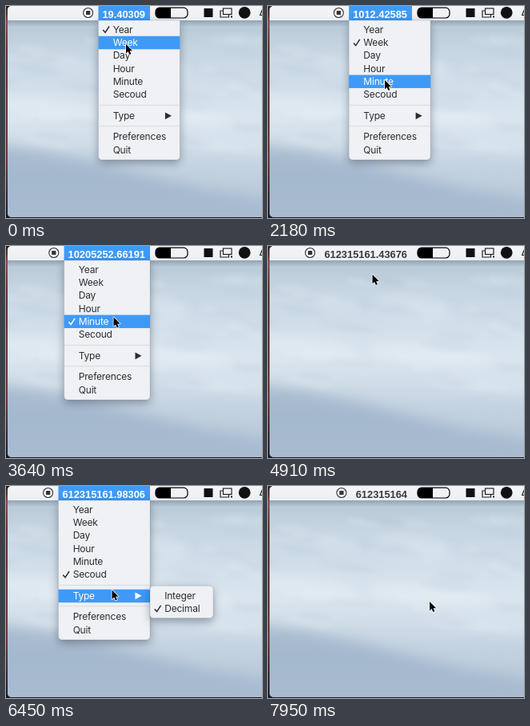
Animation of 320 by 266 pixels, one loop 8000 ms. Source, as an HTML page with a canvas:

```html
<!DOCTYPE html>
<html lang="en">
<head>
<meta charset="utf-8">
<title>Menu bar counter</title>
<style>
html, body { margin: 0; width: 100%; height: 100%; overflow: hidden; background: #3a2526; }
canvas { display: block; width: 320px; height: 266px; }
</style>
</head>
<body>
<canvas id="stage"></canvas>
<script>
const W = 320, H = 266, LOOP = 8000, STEP = 1000 / 22;
const BAR = 18, ROW = 16.4, BLUE = '#3f9af7', INK = '#2b2c2f';
const TITLE_FONT = 'bold 12.85px "Liberation Sans", Arial, sans-serif';
const MENU_FONT = '12px Inter, "Open Sans", sans-serif';

const canvas = document.getElementById('stage');
const dpr = window.devicePixelRatio || 1;
canvas.width = W * dpr;
canvas.height = H * dpr;
const ctx = canvas.getContext('2d');

// Row label and vertical centre
const ROWS = [
  ['Year', 29.5], ['Week', 45.8], ['Day', 62], ['Hour', 78.3], ['Minute', 94.6],
  ['Secoud', 111], ['Type', 137.8], ['Preferences', 164], ['Quit', 180.6]
];
const SUB_ROWS = [['Integer', 137.5], ['Decimal', 153.8]];
const UNIT = { Year: 31557600, Week: 604800, Minute: 60, Secoud: 1 };

// Each visit to the menu: opened, item clicked, unit shown meanwhile
const VISITS = [
  { open: -200, click: 350, unit: 'Year' },
  { open: 1480, click: 2400, unit: 'Week' },
  { open: 3187.2, click: 4150, unit: 'Minute' },
  { open: 5455.39, click: 7210, unit: 'Secoud', sub: 6100 }
];
const BLINK = 90, FADE = 180;

// Pointer stops: time, x, y
const PATH = [
  [0, 150, 48], [480, 150, 48], [1150, 149.5, 7], [1540, 149.5, 7],
  [2130, 146, 93], [2500, 146, 93], [3000, 138, 8], [3250, 138, 8],
  [3794, 133.6, 110], [4450, 133, 109], [5151, 129.6, 8], [5520, 129.6, 8],
  [6000, 132.5, 130.5], [6480, 132.5, 130.5], [6950, 202, 145], [8000, 202, 145]
];

function pointerAt(t) {
  const i = Math.max(1, PATH.findIndex(p => p[0] > t));
  const [t0, x0, y0] = PATH[i - 1], [t1, x1, y1] = PATH[i];
  const p = (t - t0) / (t1 - t0), s = p * p * (3 - 2 * p);
  return { x: x0 + (x1 - x0) * s, y: y0 + (y1 - y0) * s };
}

const secondsAt = t => 612315161.436765 + (t - 108 * STEP) / 1000;

function titleText(t, unit, whole) {
  const v = secondsAt(t) / UNIT[unit];
  return whole ? String(Math.floor(v)) : (Math.floor(v * 1e5) / 1e5).toFixed(5);
}

function titleLeft(text) {
  ctx.font = TITLE_FONT;
  ctx.letterSpacing = '0px';
  return 174 - ctx.measureText(text).width;
}

function fillBox(g, x, y, w, h, color, r = 0) {
  g.fillStyle = color;
  g.beginPath();
  g.roundRect(x, y, w, h, r);
  g.fill();
}

function polygon(g, pts) {
  g.beginPath();
  pts.forEach(([x, y]) => g.lineTo(x, y));
  g.closePath();
}

function gradient(g, y0, y1, stops) {
  const grad = g.createLinearGradient(0, y0, 0, y1);
  stops.forEach(([y, c]) => grad.addColorStop((y - y0) / (y1 - y0), c));
  return grad;
}

function random(seed) {
  return () => (seed = seed * 16807 % 2147483647) / 2147483647;
}

function paintSky() {
  const c = document.createElement('canvas');
  c.width = W * dpr;
  c.height = H * dpr;
  const g = c.getContext('2d');
  g.scale(dpr, dpr);
  fillBox(g, 0, 0, W, H, gradient(g, 0, H, [
    [0, '#2c2324'], [20, '#8a4a40'], [60, '#5c3433'], [190, '#6a3b38'], [266, '#1d1c20']
  ]));
  g.beginPath();
  g.roundRect(2, 0, W, 265, [5, 0, 0, 5]);
  g.clip();
  fillBox(g, 0, 0, W, H, gradient(g, 0, H, [
    [0, '#b4c5d3'], [22, '#b8c9d7'], [50, '#c4d4e0'], [80, '#cddbe7'], [112, '#d5e1eb'],
    [140, '#dae5ee'], [170, '#d1dde8'], [200, '#c5d3e1'], [266, '#b2c4d6']
  ]));

  const puff = (x, y, rx, ry, color) => {
    g.fillStyle = color;
    g.beginPath();
    g.ellipse(x, y, rx, ry, 0.12, 0, 7);
    g.fill();
  };
  g.filter = `blur(${7 * dpr}px)`;
  puff(75, 72, 40, 8, 'rgba(226,235,243,.4)');
  puff(180, 78, 50, 17, 'rgba(226,235,243,.4)');
  puff(50, 128, 65, 12, 'rgba(231,239,245,.5)');
  puff(205, 138, 80, 13, 'rgba(231,239,245,.5)');
  puff(285, 172, 55, 14, 'rgba(226,235,243,.4)');
  g.filter = `blur(${8 * dpr}px)`;
  polygon(g, [[-20, 173], [50, 183], [110, 195], [160, 209], [205, 220], [250, 231],
    [340, 246], [340, 290], [-20, 290]]);
  g.fillStyle = gradient(g, 170, 266, [[170, '#aabdd0'], [215, '#a4b8ce'], [266, '#a8bbd0']]);
  g.fill();

  const rnd = random(41);
  g.filter = `blur(${3 * dpr}px)`;
  for (let i = 0; i < 40; i++) {
    puff(rnd() * W, 40 + rnd() * 140, 10 + rnd() * 26, 2 + rnd() * 4,
      i % 2 ? 'rgba(236,243,248,.2)' : 'rgba(165,186,205,.13)');
  }
  g.filter = 'none';

  fillBox(g, 0, BAR, W, 8, gradient(g, BAR, 26, [[18, 'rgba(50,65,80,.28)'], [26, 'rgba(50,65,80,0)']]));
  fillBox(g, 0, 0, W, BAR, gradient(g, 0, BAR, [[0, '#f4f5f7'], [18, '#eceff3']]));
  paintIcons(g);
  return c;
}

function paintIcons(g) {
  // Half-filled gauge
  g.lineWidth = 1.2;
  g.strokeStyle = '#000';
  g.save();
  g.beginPath();
  g.roundRect(187, 2.2, 40, 12.8, 5);
  g.clip();
  fillBox(g, 187, 2, 19, 14, '#000');
  g.restore();
  g.beginPath();
  g.roundRect(187, 2.2, 40, 12.8, 5);
  g.stroke();

  fillBox(g, 247.5, 3, 11, 11, '#111');
  g.fillStyle = '#111';
  g.beginPath();
  g.arc(298.2, 8.3, 7.4, 0, 7);
  g.fill();

  // Overlapping windows
  g.strokeStyle = '#222';
  g.strokeRect(271.5, 3, 10.5, 7.5);
  g.beginPath();
  g.moveTo(271, 6);
  g.lineTo(268, 6);
  g.lineTo(268, 14);
  g.lineTo(278.5, 14);
  g.lineTo(278.5, 11);
  g.stroke();
  fillBox(g, 281, 12.5, 2, 2, '#222');
  g.beginPath();
  g.moveTo(321, 3);
  g.lineTo(317.6, 11.5);
  g.lineTo(321, 11.5);
  g.stroke();
}

function drawTitle(text, glow) {
  const x = titleLeft(text);
  const write = color => {
    ctx.fillStyle = color;
    ctx.fillText(text, x, 14.9);
  };
  write('#3a3b3e');
  ctx.globalAlpha = glow;
  fillBox(ctx, x - 5, 0, 185 - x, BAR, BLUE);
  write('#fff');
  ctx.globalAlpha = 1;

  const cx = x - 17.8;
  ctx.strokeStyle = '#333';
  ctx.lineWidth = 1.1;
  ctx.beginPath();
  ctx.arc(cx, 8.5, 6, 0, 7);
  ctx.stroke();
  fillBox(ctx, cx - 2.6, 5.9, 5.2, 5.2, '#333', 0.6);
}

function drawPanel(x, y, w, h, corners) {
  ctx.save();
  ctx.shadowColor = 'rgba(20,30,45,.38)';
  ctx.shadowBlur = 11 * dpr;
  ctx.shadowOffsetY = 4 * dpr;
  fillBox(ctx, x, y, w, h, '#eff1f4', corners);
  ctx.restore();
  ctx.strokeStyle = 'rgba(60,75,95,.25)';
  ctx.lineWidth = 0.6;
  ctx.stroke();
}

function drawRow([label, y], x, w, color, checked) {
  const lit = color === BLUE;
  if (color) fillBox(ctx, x, y - ROW / 2 + 0.2, w, ROW, color);
  ctx.font = MENU_FONT;
  ctx.letterSpacing = '-0.2px';
  ctx.fillStyle = lit ? '#fff' : INK;
  ctx.fillText(label, x + 18.2, y + 4.3);
  if (checked) {
    ctx.strokeStyle = ctx.fillStyle;
    ctx.lineWidth = 1.5;
    ctx.beginPath();
    ctx.moveTo(x + 5.8, y + 0.6);
    ctx.lineTo(x + 8.6, y + 3.8);
    ctx.lineTo(x + 13.6, y - 4);
    ctx.stroke();
  }
  if (label === 'Type') {
    const ax = x + w - 18.5;
    polygon(ctx, [[ax, y - 4.4], [ax + 8, y], [ax, y + 4.4]]);
    ctx.fill();
  }
}

function drawMenu(t, visit, text, pointer, alpha) {
  const since = t - visit.click;
  const x = titleLeft(text) - 5, w = Math.max(102, 180 - x);
  const subOpen = t >= visit.sub, inSub = subOpen && pointer.x >= 181;
  const blinkOff = since >= 0 && since < STEP;
  // The chosen row stays lit while the menu fades
  const focus = since > 0 ? pointerAt(visit.click) : pointer;
  const over = y => !blinkOff && Math.abs(focus.y - y) <= ROW / 2 + 0.3;

  ctx.save();
  ctx.globalAlpha = alpha;
  drawPanel(x, BAR, w, 175, [0, 0, 4.5, 4.5]);
  for (const y of [124.5, 150.8]) fillBox(ctx, x, y - 0.5, w, 1, '#d8dbe0');
  for (const row of ROWS) {
    let color = null;
    if (inSub) color = row[0] === 'Type' ? '#d5d8dd' : null;
    else if (over(row[1])) color = BLUE;
    drawRow(row, x, w, color, row[0] === visit.unit);
  }
  if (subOpen) {
    drawPanel(180, 125.3, 79, 40.5, 4.5);
    for (const row of SUB_ROWS) {
      drawRow(row, 180, 79, inSub && over(row[1]) ? BLUE : null, row[0] === 'Decimal');
    }
  }
  ctx.restore();
}

function drawPointer({ x, y }) {
  ctx.save();
  ctx.translate(x, y);
  ctx.scale(0.95, 0.95);
  polygon(ctx, [[0, 0], [0, 12], [2.7, 9.6], [4.6, 13.8], [6.7, 12.9], [4.9, 8.8], [8.6, 8.6]]);
  ctx.strokeStyle = '#fff';
  ctx.lineWidth = 1.6;
  ctx.lineJoin = 'round';
  ctx.stroke();
  ctx.fillStyle = '#000';
  ctx.fill();
  ctx.restore();
}

// The picture advances 22 times a second, on 10 ms marks
function snap(now) {
  const t = now % LOOP;
  let k = Math.floor((t + 5) / STEP);
  if (Math.round(k * STEP / 10) * 10 > t) k--;
  return k * STEP;
}

const sky = paintSky();

function draw(now) {
  const t = snap(now), pointer = pointerAt(t);
  ctx.setTransform(1, 0, 0, 1, 0, 0);
  ctx.drawImage(sky, 0, 0);
  ctx.scale(dpr, dpr);

  const visit = VISITS.findLast(v => v.open <= t);
  const next = VISITS[VISITS.indexOf(visit) + 1];
  const alpha = Math.min(1, Math.max(0, 1 - (t - visit.click - BLINK) / FADE));
  if (alpha > 0) {
    const frozen = titleText(visit.open, visit.unit);
    drawTitle(frozen, alpha);
    drawMenu(t, visit, frozen, pointer, alpha);
  } else {
    drawTitle(titleText(t, next ? next.unit : 'Secoud', !next), 0);
  }
  drawPointer(pointer);
}

function tick() {
  draw(performance.now());
  requestAnimationFrame(tick);
}
tick();
</script>
</body>
</html>
```
